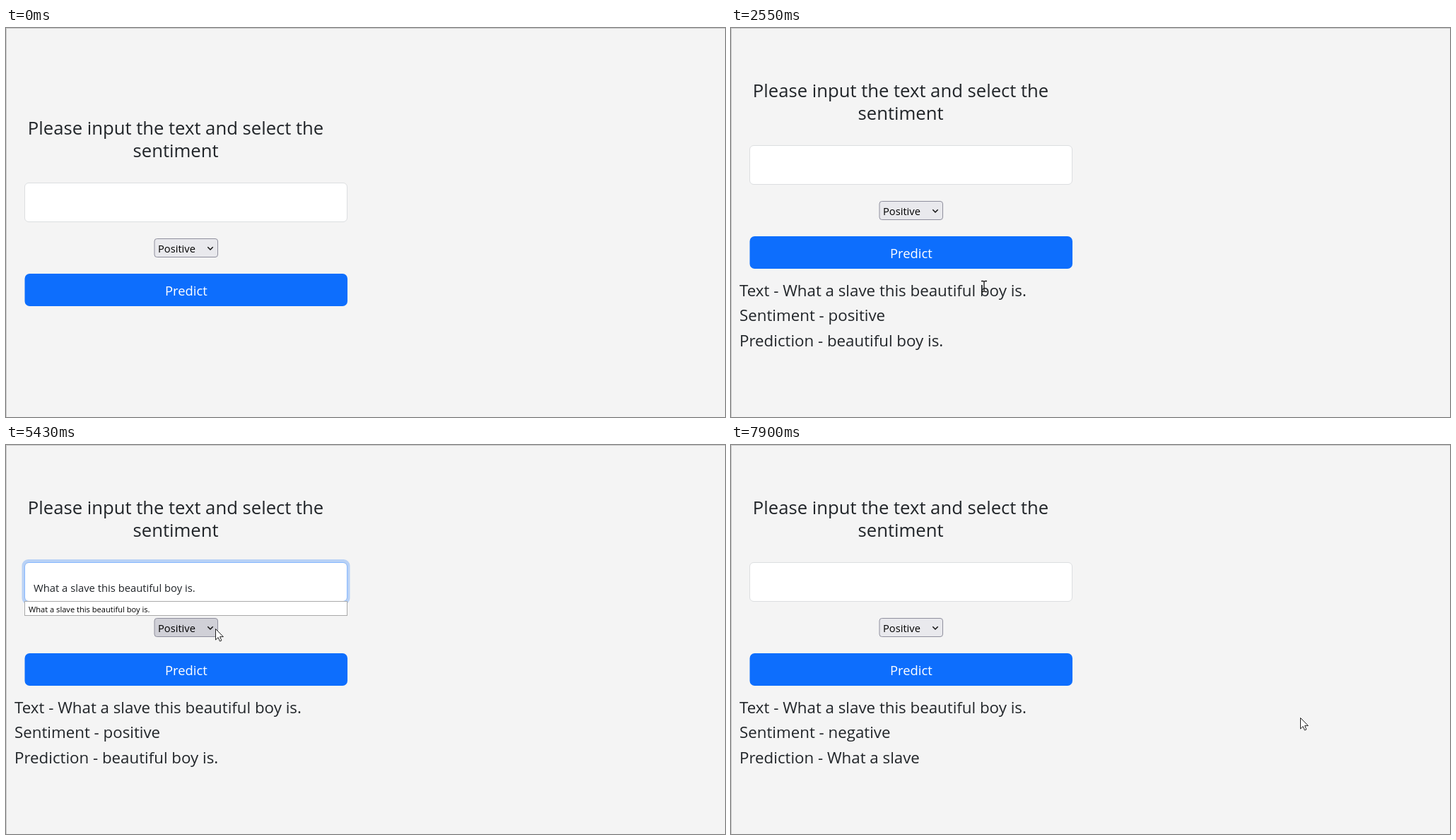
An HTML page that plays this animation: 1017x551 px, repeating every 8000 ms.

```html
<!DOCTYPE html>
<html lang="en">
<head>
<meta charset="utf-8">
<title>Sentiment form</title>
<style>
  html, body { margin: 0; width: 100%; height: 100%; overflow: hidden; background: #f4f4f4; }
  svg { display: block; font-family: "Open Sans", "Noto Sans", sans-serif; fill: #212529; }
  .mid { text-anchor: middle; }
  .title { font-size: 25.66px; }
  .result { font-size: 22.3px; }
  .choice { font-size: 14.7px; fill: #000; }
  .cursor { stroke-linejoin: round; }
</style>
</head>
<body>
<svg width="1017" height="551" viewBox="0 0 1017 551">
  <path d="M0 .5H1017M.5 0V551" stroke="#c8c8c8"/>

  <g id="form">
    <g class="title mid">
      <text x="240" y="150.5">Please input the text and select the</text>
      <text x="240" y="183">sentiment</text>
    </g>
    <rect id="ring" x="22.5" y="215" width="464" height="64" rx="9" fill="#b9d2f6"/>
    <rect x="26.5" y="219.5" width="456" height="55" rx="5.5" fill="#fff" stroke="#dcdee0"/>
    <rect id="edge" x="26.5" y="219.5" width="456" height="55" rx="5.5" fill="none" stroke="#86b7fe"/>
    <text id="entry" x="39" y="261.2" font-size="14.8">What a slave this beautiful boy is.</text>
    <path id="caret" d="M.5 244.5v21" stroke="#333"/>

    <rect id="select" x="210" y="298.5" width="89.5" height="26" rx="3.5" stroke="#8f8f9d"/>
    <text id="choice" class="choice" x="215" y="317.7"></text>
    <path d="M285.3 310.3l3.7 3.7 3.7-3.7" fill="none" stroke="#111" stroke-width="1.5"/>

    <rect id="button" x="26.5" y="348" width="456.5" height="46" rx="7"/>
    <text class="mid" x="254.8" y="379" font-size="18.4" fill="#fff">Predict</text>

    <g id="suggest">
      <rect x="26.5" y="274.5" width="456" height="20" fill="#fff" stroke="#a9a9a9"/>
      <text x="32" y="289.5" font-size="11.1" fill="#000">What a slave this beautiful boy is.</text>
    </g>

    <g id="popup">
      <rect x="210" y="325.5" width="89.5" height="70" fill="#fff" stroke="#8f8f9d"/>
      <rect id="mark" x="210.5" width="88.5" height="23" fill="#0078d7"/>
      <g class="choice">
        <text class="option" x="215" y="342.5">Positive</text>
        <text class="option" x="215" y="365.5">Negative</text>
        <text class="option" x="215" y="388.5">Neutral</text>
      </g>
    </g>
  </g>

  <g id="results" class="result">
    <text x="12" y="379.5">Text - What a slave this beautiful boy is.</text>
    <text id="mood" x="12" y="415"></text>
    <text id="answer" x="12" y="450.5"></text>
  </g>

  <g id="status">
    <rect x="-1" y="535.5" width="254.5" height="20" fill="#f9f9f9" stroke="#e2e2e2"/>
    <text x="1.5" y="550" font-size="10.4" fill="#555">192.0.2.1</text>
  </g>

  <g id="arrow" class="cursor">
    <path d="M.5 .5V16l3.6-3.4L6.5 18l2.4-1.1L6.6 11.6H11.4Z" fill="#fff" stroke="#222"/>
  </g>
  <g id="beam" class="cursor">
    <path d="M-4 -7.5H-1.2L0 -6.8 1.2 -7.5H4M0 -7V7M-4 7.5H-1.2L0 6.8 1.2 7.5H4" fill="none" stroke="#111" stroke-width="1.3"/>
  </g>
  <g id="hand" class="cursor">
    <path d="M-2.8 7V-1.2C-2.8 -3.3 .3 -3.3 .3 -1.2V4C1 2.9 3 3 3.1 4.3 3.9 3.4 5.6 3.8 5.7 5 6.7 4.3 8 5 8 6.4V10.5C8 13 6.9 14 6.5 16.8H-1.5C-2 14 -5 11.5 -7 9 -8.3 7.2 -6.2 5.7 -4.7 7.2L-2.8 9Z" fill="#fff" stroke="#111" stroke-width="1.1"/>
    <path d="M.3 4V7.5M3.1 4.5V8M5.7 5.2V8.2" fill="none" stroke="#111"/>
  </g>
</svg>

<script>
const $ = id => document.getElementById(id);
const LOOP = 8000, LIFT = 53;

const within = (v, a, b) => v >= a && v < b;
const ramp = (t, start, span = 150) => Math.min(1, Math.max(0, (t - start) / span));
const pulse = (t, on, off) => ramp(t, on) * (1 - ramp(t, off));
const ease = k => k * k * (3 - 2 * k);
const mix = (a, b, k) => a.map((v, i) => Math.round(v + (b[i] - v) * k));
const show = (id, amount) => $(id).setAttribute("opacity", +amount);
const move = (id, x, y) => $(id).setAttribute("transform", `translate(${x} ${y})`);

// The pointer rests between moves: to(start, duration, x, y)
const moves = [];
const to = (start, span, x, y) => moves.push({ start, span, spot: [x, y] });
to(100, 40, 680, 401);   // enters
to(330, 340, 404, 250);  // input
to(1380, 310, 358, 366); // button
to(2960, 90, 290, 262);  // select
to(3400, 330, 355, 212); // input
to(4790, 510, 296, 260); // select
to(5670, 230, 262, 307); // second option
to(6090, 220, 274, 325); // button
to(7400, 270, 713, 281); // leaves
to(7880, 20, 805, 386);

const pointer = t => moves.reduce(
  (at, m) => mix(at, m.spot, ease(ramp(t, m.start, m.span))), [692, 407]);

function draw(t) {
  const done = t >= 2550, second = t >= 7280;
  const lift = done ? LIFT : 0;
  const open = within(t, 5560, 6080);
  const filled = within(t, 1090, 2550) || within(t, 4410, 7280);
  const listed = within(t, 1090, 1900) || within(t, 4410, 5540);
  const [x, y] = pointer(t);
  const formY = y + lift;
  const overForm = within(x, 26, 483);

  move("form", 0, -lift);
  const focus = pulse(t, 820, 1900) + pulse(t, 3790, 5540);
  show("ring", focus);
  show("edge", focus);
  show("entry", filled);
  show("caret", within(t, 830, 1560) || within(t, 3830, 4880));
  move("caret", filled ? 267 : 38.5, 0);
  show("suggest", listed);

  const overSelect = within(x, 210, 300) && within(formY, 298, 325);
  $("select").setAttribute("fill", overSelect || open ? "#d0d0d7" : "#e9e9ed");
  $("choice").textContent = within(t, 6080, 7280) ? "Negative" : "Positive";

  show("popup", open);
  const row = t >= 5800 ? 1 : 0;
  $("mark").setAttribute("y", 326 + 23 * row);
  document.querySelectorAll(".option").forEach((o, i) => o.style.fill = i === row ? "#fff" : "#000");

  const hover = (done ? 0 : ramp(t, 1680)) + pulse(t, 6310, 7420);
  $("button").setAttribute("fill", `rgb(${mix([13, 110, 253], [10, 92, 214], hover)})`);

  show("results", done);
  $("mood").textContent = "Sentiment - " + (second ? "negative" : "positive");
  $("answer").textContent = "Prediction - " + (second ? "What a slave" : "beautiful boy is.");
  show("status", within(t, 2000, 2550) || within(t, 6680, 7280));

  const overButton = overForm && within(formY, 348, 394);
  const overText = overForm && within(formY, 219, 275) || done && x < 417 && within(y, 358, 390);
  const kind = open ? "arrow" : overButton ? "hand" : overText ? "beam" : "arrow";
  for (const id of ["arrow", "beam", "hand"]) {
    show(id, t >= 70 && id === kind);
    move(id, x, y);
  }
}

function tick() {
  draw(performance.now() % LOOP);
  requestAnimationFrame(tick);
}
tick();
</script>
</body>
</html>
```
